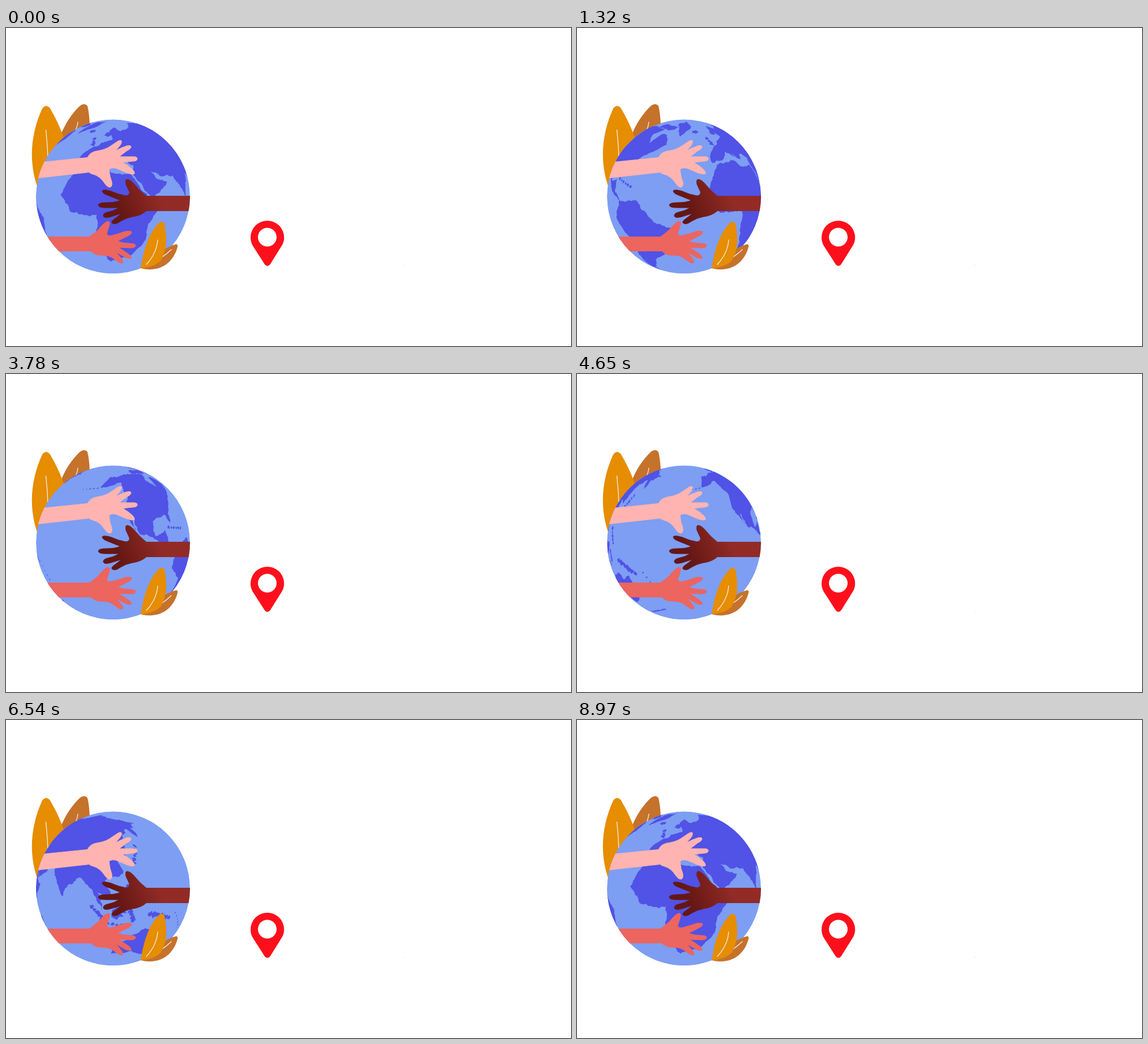
An HTML page for the animation above (9000 ms loop, 998 by 561 pixels).

```html
<!DOCTYPE html>
<html lang="en">
<head>
<meta charset="utf-8">
<title>Hands around the globe</title>
<style>
html, body { margin: 0; width: 100%; height: 100%; overflow: hidden; background: #fff; }
svg { display: block; width: 100vw; height: 100vh; }
.vein { fill: none; stroke: #f4efec; stroke-width: 1.3; stroke-linecap: round; }
.hand path { stroke-width: 1; stroke-linejoin: round; }
</style>
</head>
<body>
<svg viewBox="0 0 998 561">
  <defs>
    <clipPath id="disc"><circle cx="189" cy="297.3" r="136"/></clipPath>
    <linearGradient id="skin" gradientUnits="userSpaceOnUse" x1="190" y1="335" x2="272" y2="300">
      <stop offset=".15" stop-color="#651714"/><stop offset="1" stop-color="#922b26"/>
    </linearGradient>
  </defs>

  <!-- leaves behind the globe -->
  <path fill="#c5722b" d="M94 195C104 168 117 150 131 137Q139 131 144 138Q147 150 148 172L120 210Z"/>
  <path class="vein" d="M127 166Q126 174 122 183"/>
  <path fill="#e68d00" d="M55 279C41 238 42 190 64 142Q71 133 78 142Q95 171 103 197L105 235Z"/>
  <path class="vein" d="M70.5 180Q73 204 74 228"/>

  <g clip-path="url(#disc)">
    <circle cx="189" cy="297.3" r="136" fill="#7d9ef3"/>
    <path id="land" fill="#5152e6"/>
    <g class="hand">
      <path fill="#ffb4b1" stroke="#ffb4b1" d="M40 238L70 236L144 228.5Q148 219 160 217Q174 215 182 210L197 200Q202 197 204 199Q205 203 201 208L193 217Q203 211 213 208Q221 206 221 210Q220 214 213 217L200 227Q214 227 226 227Q232 227 232 231Q231 235 224 235L206 237Q217 243 223 249Q228 254 227 257Q223 259 212 255L196 248Q188 245 182 249Q183 262 187 272Q188 281 183 281Q179 281 175 275Q166 261 154 258Q149 257 147 254.5L57 264.5L40 267Z"/>
      <path fill="url(#skin)" stroke="url(#skin)" d="M340 296.5L248 296.5Q236 287 229 278Q220 267 214 267Q210 267 212 276L218 289Q219 295 212 296Q199 294 186 288Q173 284 170 287Q170 291 177 294L202 304Q193 308 178 308Q164 308 163 312Q163 317 176 317L200 317Q190 323 179 325Q171 327 172 332Q174 336 185 333L204 327Q196 334 190 338Q184 343 189 345Q194 347 202 341Q212 335 223 333Q239 331 248 322.5L340 322.5Z"/>
      <path fill="#ec655f" stroke="#ec655f" d="M50 368.5L147 368.5Q157 362 164 355Q174 342 180 341Q185 341 182 350L178 362Q178 368 187 366Q199 363 210 359Q221 357 222 360Q222 364 213 368L197 376Q207 380 219 380Q229 380 229 384Q228 388 219 388L199 387Q208 393 217 399Q223 405 221 406Q216 408 206 402L194 395Q200 402 205 408Q208 414 205 415Q200 415 193 409Q184 401 172 401Q158 402 150 393.5L50 393.5Z"/>
    </g>
  </g>

  <!-- leaves in front -->
  <path fill="#c5722b" d="M238 424C259 406 274 389 300 381.5Q304 381 303 386C296 414 272 432 238 424Z"/>
  <path class="vein" d="M292 391Q275 407 248 420"/>
  <path fill="#e68d00" d="M238 424C242 395 251 363 270 344Q276 339 280 345C284 369 286 388 273 411Q261 422 238 424Z"/>
  <path class="vein" d="M268 374Q266 398 248 417"/>

  <path fill="#ff0f1b" fill-rule="evenodd" d="M432 369.5A29.6 29.6 0 0 1 491.2 369.5C491.2 378 488 383 484 389L466.5 417Q461.7 422.5 457 417L439 389C435 383 432 378 432 369.5ZM445 369A16.5 16.5 0 1 0 478 369A16.5 16.5 0 1 0 445 369Z"/>
  <circle cx="703" cy="418.5" r=".7" fill="#ddd"/>
</svg>

<script>
const RAD = Math.PI / 180, SIZE = 136, EYE = 6, TILT = 16 * RAD;
const FOCUS = Math.sqrt(EYE * EYE - 1);

let seed = 7;
const random = () => (seed = seed * 16807 % 2147483647) / 2147483647;

// Joins a few key points (longitude, latitude) with a randomly rough coast
function coast(...corners) {
  const points = [];
  const split = ([x, y], [u, v]) => {
    const length = Math.hypot(u - x, v - y);
    if (length < 2) return points.push([x, y]);
    const bend = (random() - .5) * Math.min(.35, 2 / length);
    const middle = [(x + u) / 2 + (v - y) * bend, (y + v) / 2 - (u - x) * bend];
    split([x, y], middle);
    split(middle, [u, v]);
  };
  corners.forEach((p, i) => split(p, corners[(i + 1) % corners.length]));
  return [points];
}

// Scatters uneven islands along a line
function islands(count, size, [x, y], [u, v]) {
  return Array.from({ length: count }, (_, i) => {
    const f = i / (count - 1), lat = y + (v - y) * f, lon = x + (u - x) * f;
    const r = size * (.7 + .6 * random()), wide = r / Math.cos(lat * RAD);
    return Array.from({ length: 12 }, (_, k) => {
      const a = k * Math.PI / 6, rough = .6 + .7 * random();
      return [lon + wide * rough * Math.cos(a), lat + r * rough * Math.sin(a)];
    });
  });
}

const shapes = [
  // Eurasia
  ...coast([-9, 37], [0, 38], [9, 44], [17, 39], [14, 45], [23, 36], [27, 40], [36, 36], [34, 29], [44, 13], [59, 22],
    [51, 25], [48, 30], [57, 26], [67, 25], [77, 8], [81, 16], [90, 22], [98, 15], [103, 2], [101, 13], [109, 12],
    [107, 21], [121, 27], [120, 38], [128, 36], [141, 54], [156, 59], [157, 51], [165, 60], [189, 66], [140, 73],
    [104, 78], [70, 70], [40, 66], [27, 71], [6, 60], [20, 62], [22, 57], [8, 54], [-3, 48], [-9, 43]),
  // Africa
  ...coast([-10, 29], [-17, 14], [-8, 4], [9, 4], [10, -14], [18, -34], [33, -27], [40, -15], [40, -4], [51, 11],
    [43, 12], [32, 30], [20, 31], [10, 37], [-6, 35]),
  // North America
  ...coast([-162, 55], [-140, 60], [-124, 48], [-122, 37], [-110, 23], [-113, 31], [-105, 20], [-85, 10], [-77, 8],
    [-84, 12], [-87, 21], [-95, 18], [-97, 28], [-84, 30], [-80, 25], [-81, 31], [-70, 42], [-56, 52], [-64, 59],
    [-77, 62], [-80, 52], [-94, 60], [-82, 68], [-128, 70], [-167, 66]),
  // South America
  ...coast([-81, -5], [-70, -18], [-75, -48], [-68, -55], [-66, -46], [-57, -36], [-41, -22], [-35, -6], [-50, 0],
    [-62, 11], [-77, 8]),
  // Australia, Greenland
  ...coast([114, -24], [115, -34], [131, -32], [147, -38], [153, -27], [142, -11], [136, -16], [131, -12]),
  ...coast([-54, 70], [-44, 60], [-22, 72], [-30, 83], [-70, 78]),
  // Atlantic and Arctic
  ...islands(5, 3, [-110, 72], [-70, 70]),
  ...islands(2, 1.6, [-21, 65], [-17, 65]),
  ...islands(3, 1.5, [-2, 52], [-4, 57]),
  ...islands(6, .9, [-83, 22], [-69, 19]),
  ...islands(5, 1.8, [46, -23], [48, -15]),
  // Pacific
  ...islands(6, 1.3, [131, 32], [143, 44]),
  ...islands(5, 1.2, [121, 17], [125, 8]),
  ...islands(6, 1.5, [97, 4], [105, -5]),
  ...islands(6, .9, [107, -7], [120, -9]),
  ...islands(3, 3, [112, 0], [116, 4]),
  ...islands(4, 1.3, [120, 1], [122, -5]),
  ...islands(6, 2, [133, -2], [148, -8]),
  ...islands(6, .7, [154, -6], [167, -21]),
  ...islands(6, 1.3, [168, -46], [177, -38]),
  ...islands(5, .6, [-180, 52], [-164, 54])];

// The flat map narrows toward the poles before it is wrapped on the sphere
const wrap = ([lon, lat]) =>
  [(1.08 * (1 - .47 * Math.abs(lat / 90) ** 2.1) * lon - 20) * RAD, lat * RAD];
const coasts = shapes.map(shape => shape.map(wrap));

function outline(points, turn) {
  let seen = false;
  const path = points.map(([lon, lat]) => {
    const c = Math.cos(lat), s = Math.sin(lat), h = Math.cos(lon + turn);
    const x = c * Math.sin(lon + turn), y = s * Math.cos(TILT) - c * Math.sin(TILT) * h;
    const z = s * Math.sin(TILT) + c * Math.cos(TILT) * h;
    const front = z > 1 / EYE;
    seen = seen || front;
    const k = SIZE * (front ? FOCUS / (EYE - z) : 1 / Math.hypot(x, y));
    return (189 + x * k).toFixed(1) + " " + (297.3 - y * k).toFixed(1);
  });
  return seen ? "M" + path.join("L") + "Z" : "";
}

const land = document.getElementById("land");
function draw(now) {
  const time = Math.floor(now % 9000 / 30) * 30;
  const turn = time / 9000 * 2 * Math.PI;
  land.setAttribute("d", coasts.map(p => outline(p, turn)).join(""));
  requestAnimationFrame(draw);
}
draw(performance.now());
</script>
</body>
</html>
```
